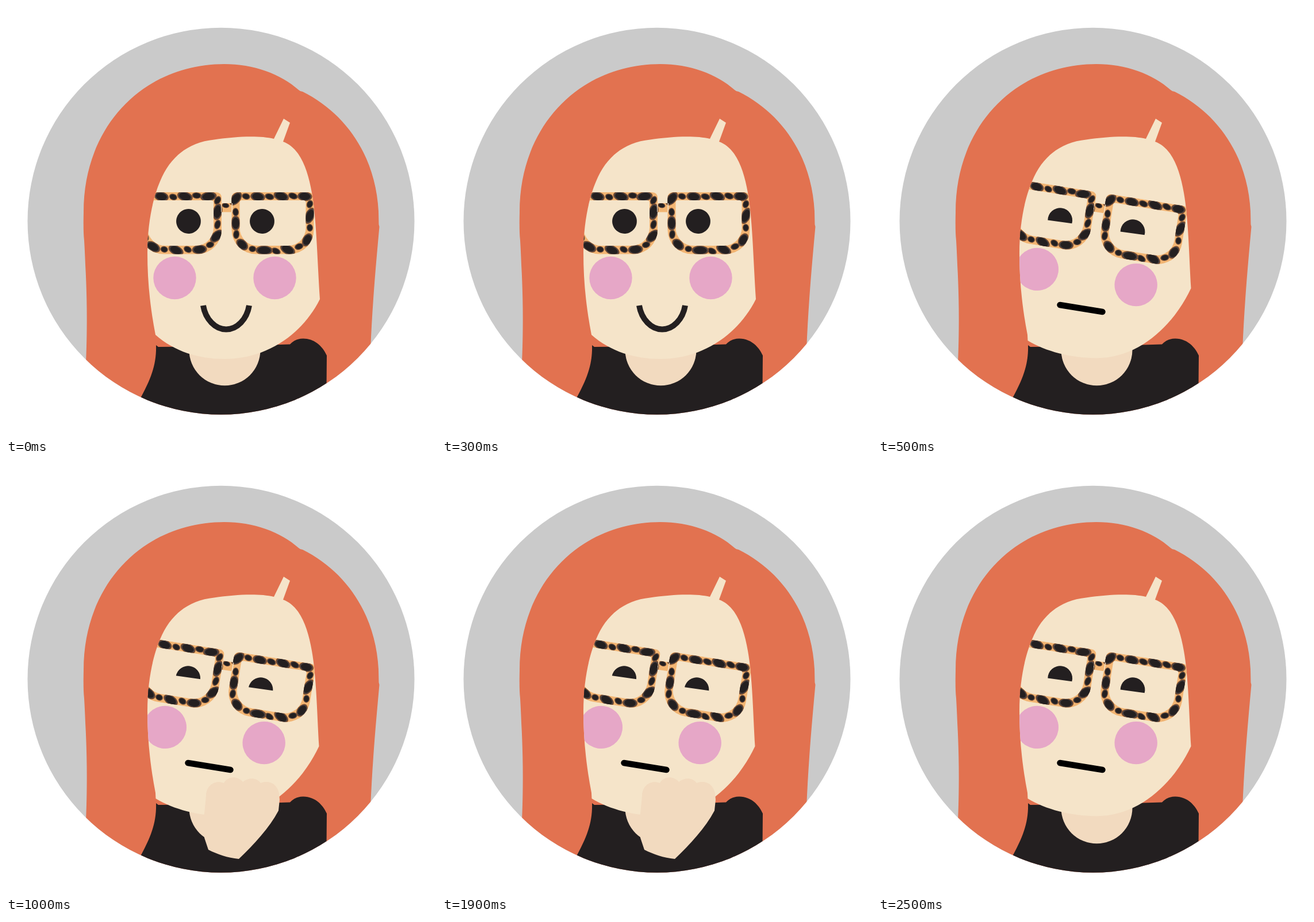
An HTML page for the animation above (3000 ms loop, 748 px wide and 748 px high).

```html
<!DOCTYPE html>
<html lang="en">
<head>
<meta charset="utf-8">
<title>Thinking portrait</title>
<style>
  html, body { margin: 0; width: 100%; height: 100%; overflow: hidden; background: #fff; }
  svg { display: block; width: 100vw; height: 100vh; }
</style>
</head>
<body>
<svg viewBox="0 0 748 748">
  <defs>
    <clipPath id="disc"><circle cx="374" cy="374.3" r="336.5"/></clipPath>
    <clipPath id="faceClip"><path id="faceEdge"/></clipPath>
    <clipPath id="frameClip"><path id="frameEdge" clip-rule="evenodd"/></clipPath>
  </defs>
  <g clip-path="url(#disc)">
    <rect width="748" height="748" fill="#cacaca"/>
    <path fill="#e27250" d="M138 640 C141 590 142 520 138 450 Q137 425 136 408 C134 390 135 365 135 358
      C135 208 240 101 380 101 C430 101 478 118 509 146 Q512 149 516 149
      C592 187 643 262 648 357 L648.500 380 L649.500 384 C644 445 637 520 634 600 V720 H138 Z"/>
    <path fill="#231f20" d="M261 590 L265 593 L380 592 L494 588.500 C500 582 508 578.500 517 578.500
      C535 578.500 550 590 558 608 L557 720 H220 L234.500 681 C253 647 262 622 261 590 Z"/>
  </g>
  <circle cx="380.500" cy="598.300" r="62" fill="#f2dabf"/>
  <path id="face" fill="#f5e4c9"/>
  <g clip-path="url(#faceClip)">
    <g id="features">
      <circle cx="293.500" cy="473" r="37.200" fill="#e6a7c7"/>
      <circle cx="467.500" cy="473" r="37.200" fill="#e6a7c7"/>
      <g id="glasses" clip-path="url(#frameClip)">
        <rect x="225" y="318" width="320" height="120" fill="#f2b573"/>
      </g>
    </g>
  </g>
  <path id="eyes" fill="#231f20"/>
  <path id="smile" d="M343 521 C347 545 364 562.500 383 562.500 S419 545 423 521" fill="none" stroke="#231f20" stroke-width="10"/>
  <path id="flatMouth" d="M316.500 520 L390.500 532" stroke="#000" stroke-width="10.500" stroke-linecap="round"/>
  <path id="hand" fill="#f2dabf" d="M344.500 612 C346 600 347 590 348 576 C349 560 362 549 379 555
    C385 543 403 542 412 553 C422 545 436 545 443 555 C458 549 472 557 475 573 L476 584 L474 603
    C458 633 432 661 405 687 C385 685 368 679 352 671 L345 650 Z"/>
</svg>
<script>
const $ = id => document.getElementById(id);

function make(tag, attrs) {
  const el = document.createElementNS('http://www.w3.org/2000/svg', tag);
  for (const name in attrs) el.setAttribute(name, attrs[name]);
  return el;
}

function lens(x, y, w, h, top, low) {
  return `M${x + top} ${y}h${w - 2 * top}q${top} 0 ${top} ${top}v${h - top - low}` +
    `a${low} ${low} 0 0 1 ${-low} ${low}h${2 * low - w}` +
    `a${low} ${low} 0 0 1 ${-low} ${-low}v${top + low - h}q0 ${-top} ${top} ${-top}z`;
}
const rim = x => lens(x, 324, 143, 107.5, 10, 42) + lens(x + 14, 338, 115, 79, 4, 31);
const leftX = 232, rightX = 392.5;
$('frameEdge').setAttribute('d', rim(leftX) + rim(rightX) + 'M374 343h20v15.500h-20z');

let seed = 7;
function random() {
  seed = (seed * 16807) % 2147483647;
  return seed / 2147483647;
}

function spot(x, y, rx, ry, turn) {
  const layer = (grow, fill) => $('glasses').append(make('ellipse', {
    rx: rx * grow, ry: ry * grow, fill, transform: `translate(${x} ${y}) rotate(${turn})`
  }));
  layer(1.1, '#80502f');
  layer(0.97, '#4a4040');
  layer(0.82, '#231f20');
}

// Leopard print: large and small spots take turns along each rim
function printRim(x, first) {
  const path = make('path', { d: lens(x + 7, 331, 129, 93.5, 7, 36) });
  const total = path.getTotalLength();
  const count = 20, step = total / count;
  for (let i = 0; i < count; i++) {
    const at = first + i * step;
    const p = path.getPointAtLength(at % total);
    const q = path.getPointAtLength((at + 1) % total);
    const angle = Math.atan2(q.y - p.y, q.x - p.x) * 180 / Math.PI;
    const size = i % 2 ? 11 + 3 * random() : 6 + 2 * random();
    const side = i % 2 ? 2 : 5;
    spot(p.x, p.y + (random() - 0.5) * side, size, i % 2 ? 7.5 : 5, angle + 40 * random() - 10);
  }
}
printRim(leftX, 4);
printRim(rightX, 11);
spot(382, 347, 6, 4, 10);

const faceTop = 'M260 572 C250 520 246 475 246 430 C246 380 255 335 268 305 C285 263 317 237 362 232.500 ' +
  'C400 227 440 225 466 231 L483 196 L494 203 L482 236 C512 247 525 285 532 325 C540 370 541 430 ';
const straightFace = faceTop + '546 510 C516 570 455 614 380 614 C335 614 293 601 260 572Z';
const tiltedFace = faceTop + '544.500 491 C516 552 457 612.500 380 612.500 C335 612 292 601 260.500 582Z';

// Eye disc with everything further than `cut` below its centre removed
function eye(cx, cy, cut) {
  const r = 21.4, tilt = 8 * Math.PI / 180;
  const half = Math.sqrt(r * r - cut * cut);
  const dx = half * Math.cos(tilt), dy = half * Math.sin(tilt);
  const mx = cx - cut * Math.sin(tilt), my = cy + cut * Math.cos(tilt);
  return `M${mx - dx} ${my - dy}A${r} ${r} 0 ${cut > 0 ? 1 : 0} 1 ${mx + dx} ${my + dy}Z`;
}
const openEyes = eye(317.5, 374.5, 21.39) + eye(445.5, 374.5, 21.39);
const loweredEyes = cut => eye(316.7, 372.7, cut) + eye(443, 392.7, cut);

function show(id, on) { $(id).setAttribute('visibility', on ? 'visible' : 'hidden'); }

function draw(t) {
  const tilted = t >= 500;
  const pondering = t >= 1000 && t < 2500;
  const face = tilted ? tiltedFace : straightFace;
  $('face').setAttribute('d', face);
  $('faceEdge').setAttribute('d', face);
  $('features').setAttribute('transform', `rotate(${tilted ? 9 : 0} 381.200 359.500)`);
  $('eyes').setAttribute('d', tilted ? loweredEyes(pondering ? -1.5 : 2.7) : openEyes);
  show('smile', !tilted);
  show('flatMouth', tilted);
  show('hand', pondering);
}

const start = performance.now();
function tick() {
  draw((performance.now() - start) % 3000);
  requestAnimationFrame(tick);
}
tick();
</script>
</body>
</html>
```
